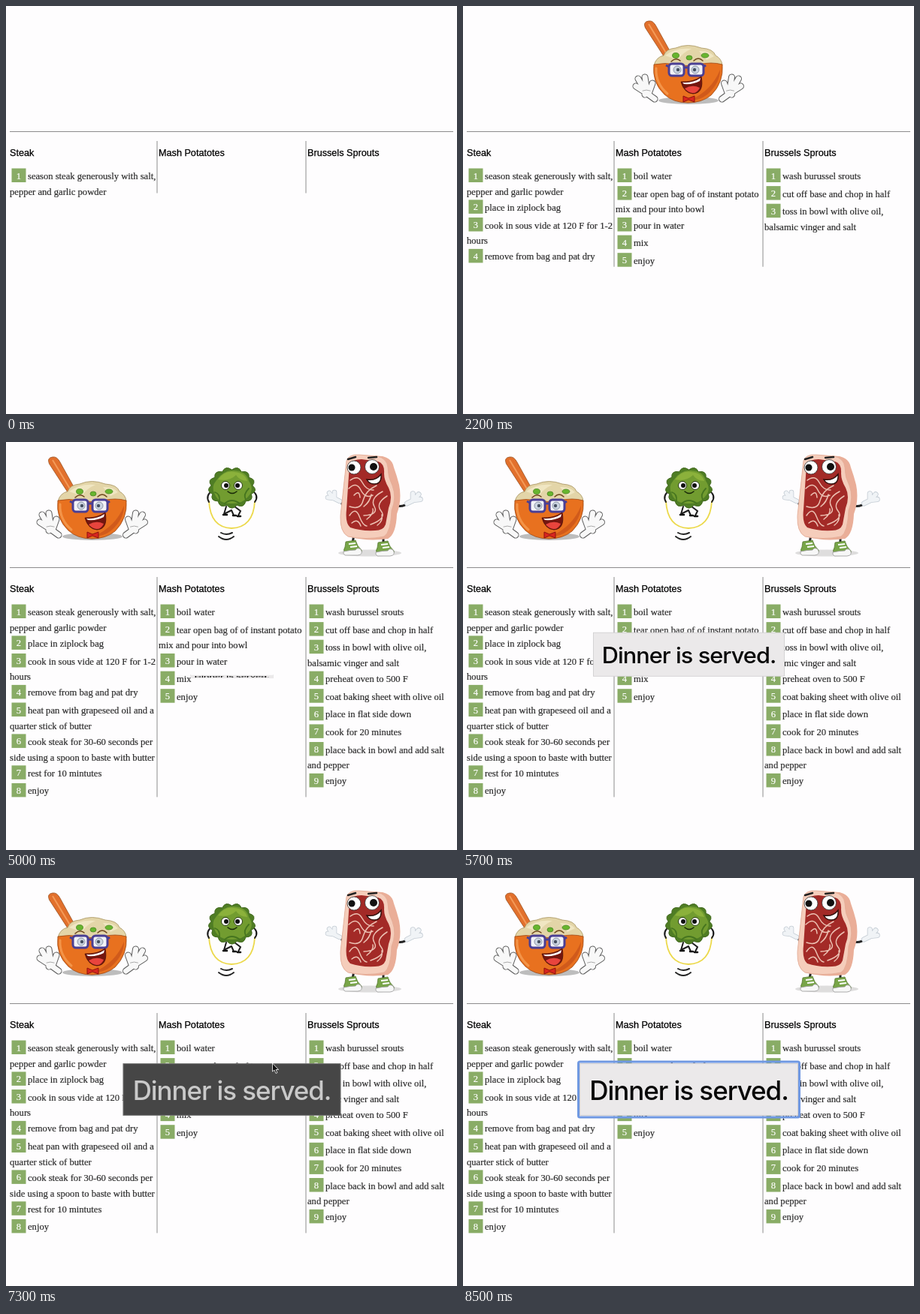
Animation, 600 px wide and 544 px high, one loop 8600 ms. Source, as an HTML page:

```html
<!DOCTYPE html>
<html lang="en">
<head>
<meta charset="utf-8">
<title>Dinner</title>
<style>
html, body { margin: 0; width: 100%; height: 100%; overflow: hidden; background: #fefdfe; }
svg { display: block; }
.step { font: 12.6px "Liberation Serif", Times, serif; fill: #2c2c2c; }
.step text { stroke: #2c2c2c; stroke-width: .2; }
.step .num { fill: #fff; stroke: #fff; text-anchor: middle; }
.head { font: 12.65px "Liberation Sans", Arial, sans-serif; stroke: #000; stroke-width: .25; }
#button text { font: 500 35px Inter, Roboto, sans-serif; letter-spacing: -1.05px; text-anchor: middle; }
.line { fill: none; stroke-linecap: round; stroke-linejoin: round; }
</style>
</head>
<body>
<svg width="600" height="544" viewBox="0 0 600 544">
  <defs>
    <path id="fingers" d="M70 124L59 116L45 107M59 116L48 97M60 114L57 95M62 117L67 103M57 118L61 116"/>
    <g id="hand" class="line">
      <use href="#fingers" stroke="#5d5d5d" stroke-width="9"/>
      <use href="#fingers" stroke="#f8f8f8" stroke-width="7"/>
      <path d="M64 113Q59 111 54 113" stroke="#aaa"/>
    </g>
    <path id="glovePath" d="M444 79L436 75L428 74M436 75L430 68M437 75L437 67"/>
    <g id="glove" class="line">
      <use href="#glovePath" stroke="#c4ccd4" stroke-width="6.5"/>
      <use href="#glovePath" stroke="#f0f3f6" stroke-width="5"/>
    </g>
    <g id="shoe">
      <path d="M452 133L465 131Q467 139 473 144Q474 149 468 149L451 148Q448 144 451 140Z" fill="#78a548" stroke="#55772f" stroke-width=".8"/>
      <path d="M449 146Q458 144 465 144Q467 140 472 143Q476 150 468 151L451 151Q448 149 449 146Z" fill="#f7f7f7" stroke="#999" stroke-width=".8"/>
      <path d="M456 136l9-1M458 140l9-1" stroke="#fff" stroke-width="2"/>
    </g>
  </defs>

  <g id="bowl">
    <ellipse cx="115" cy="126" rx="40" ry="5" fill="#bdbdbd"/>
    <path d="M57.500 29Q54 21 62 20Q68 19 72 27L93 65L84 70Z" fill="#e2702c" stroke="#9a5020" stroke-width=".8"/>
    <path d="M62 24L86 64" stroke="#f39a58" stroke-width="2"/>
    <path d="M69 79Q72 68 82 66Q85 57 98 56Q114 49 132 56Q148 57 151 66Q159 70 160 79Q116 92 69 79Z" fill="#e3d5a8" stroke="#a8935f" stroke-width=".8"/>
    <path d="M84 66Q98 55 119 57Q107 62 101 72ZM129 60Q142 59 149 67L139 72Z" fill="#f0e6c2"/>
    <path d="M69 78Q84 75 99 78Q113 81 128 78Q146 74 160 78Q162 102 145 119Q133 129 114 129Q95 129 83 118Q66 102 69 78Z" fill="#e8711f" stroke="#9c4a18" stroke-width=".8"/>
    <path d="M72 83Q71 103 87 117" class="line" stroke="#f39448" stroke-width="3"/>
    <path d="M157 85Q157 103 140 118Q130 126 116 126Q146 113 157 85Z" fill="#d05a1b"/>
    <g fill="#68b52f" stroke="#417d1c" stroke-width=".7">
      <ellipse cx="98" cy="66" rx="4.500" ry="3.500"/><ellipse cx="116" cy="69" rx="4" ry="3"/><ellipse cx="137" cy="66" rx="5" ry="3"/>
    </g>
    <path d="M92 74Q98 68 104 73M122 73Q128 67 134 73" class="line" stroke="#6d461c" stroke-width="1.500"/>
    <g fill="#f2f3f7" stroke="#4a3f94" stroke-width="3">
      <rect x="89" y="77" width="20" height="16" rx="4"/><rect x="115" y="77" width="20" height="16" rx="4"/>
      <path d="M109 82h6M89 81l-4-2M135 81l3-2"/>
    </g>
    <g fill="#ccd5e2" stroke="#7b8698" stroke-width=".8"><circle cx="100" cy="85" r="5"/><circle cx="124" cy="85" r="5"/></g>
    <circle cx="101" cy="85" r="2.200" fill="#465062"/><circle cx="123" cy="85" r="2.200" fill="#465062"/>
    <path d="M105 101Q121 102 132 94Q136 116 121 117Q109 116 105 101Z" fill="#74160f" stroke="#4b1008" stroke-width=".8"/>
    <path d="M110 110Q120 104 130 109Q126 117 120 116Q114 115 110 110Z" fill="#e8443d"/>
    <path d="M107 102Q121 103 131 96L130 100Q121 105 109 104Z" fill="#fff"/>
    <path d="M108 120L115 123L123 120V128L115 125L108 128Z" fill="#d8261f" stroke="#8d130f"/>
    <use href="#hand"/><use href="#hand" transform="matrix(-1 0 0 1 229.500 0)"/>
  </g>

  <g id="sprout">
    <path d="M270 79Q272 114 300 115Q329 114 331 79" class="line" stroke="#ecd94a" stroke-width="1.800"/>
    <path d="M274 65Q265 72 270 80M328 65Q337 72 331 80M293 86L290 96L300 91L303 98M304 86L312 92L309 98" class="line" stroke="#1d1d1d" stroke-width="2"/>
    <path d="M289 97h5M302 98h4M308 99h4" class="line" stroke="#111" stroke-width="2.500"/>
    <path id="leaves" fill="#4f7d24" stroke="#42691f"/>
    <path d="M280 51Q289 37 304 38Q320 39 323 52Q331 63 322 73Q314 83 299 82Q283 82 278 70Q272 60 280 51Z" fill="#729c30"/>
    <path d="M282 50Q291 37 304 40Q318 41 321 52Q310 51 306 44Q297 53 282 50Z" fill="#8bb13b"/>
    <path d="M278 67Q285 69 284 79M323 62Q315 70 319 77M291 82Q300 74 311 82" class="line" stroke="#46751f" stroke-width="1.800"/>
    <g fill="#fff" stroke="#24380f"><circle cx="292" cy="58" r="5.500"/><circle cx="309" cy="58" r="5.500"/></g>
    <circle cx="293" cy="58" r="3" fill="#111"/><circle cx="308" cy="58" r="3" fill="#111"/>
    <path d="M295 66Q301 71 307 66" class="line" stroke="#182808" stroke-width="1.500"/>
    <path d="M286 121Q293 125 301 121M283 126Q293 134 303 126" class="line" stroke="#222" stroke-width="2"/>
  </g>

  <g id="meat">
    <ellipse cx="484" cy="148" rx="42" ry="4.500" fill="#dedddd"/>
    <path d="M463 124L461 134M502 125L502 135M448 85Q446 78 442 79M520 85Q529 87 535 81" class="line" stroke="#252525" stroke-width="3"/>
    <use href="#glove"/><use href="#glove" transform="matrix(-1.100 0 0 1.100 1022 -5)"/>
    <use href="#shoe"/><use href="#shoe" transform="translate(43 1)"/>
    <path d="M453 25Q456 16 470 17L501 19Q514 22 516 34Q520 45 523 57Q527 77 520 96Q519 123 508 129Q481 133 455 126Q444 120 445 98Z" fill="#eaae98"/>
    <path d="M453 25Q456 16 470 17L494 19Q507 22 508 34Q508 47 514 58Q520 74 513 91Q512 120 503 126Q479 131 455 126Q444 120 445 98Z" fill="#f5cdbb" stroke="#e2ab96" stroke-width=".8"/>
    <path d="M457 30Q461 23 473 23L495 26Q504 29 503 42Q503 51 509 61Q515 73 509 88Q507 99 505 110Q502 118 491 118Q472 119 458 114Q451 108 453 90Z" fill="#a32a27"/>
    <path d="M458 51Q468 43 474 54T489 64M456 62Q466 52 472 64T488 71M493 58Q478 65 475 78T457 86M501 66Q484 75 490 86T476 98M507 72Q491 82 499 92T485 110M457 98Q465 86 470 99T480 112M463 71Q470 63 471 74M460 108Q468 101 472 112M476 86Q484 80 486 70M480 103Q490 95 488 89M494 111Q502 105 500 97" class="line" stroke="#ecc0b2" stroke-width="1.500"/>
    <g fill="#fff" stroke="#333" stroke-width=".8"><circle cx="463" cy="34" r="9"/><circle cx="487" cy="33" r="9.500"/></g>
    <circle cx="460" cy="34" r="4.500" fill="#111"/><circle cx="489" cy="33" r="5" fill="#111"/>
    <path d="M455 23L465 20M482 21L493 20" class="line" stroke="#222" stroke-width="2.500"/>
    <path d="M480 50Q492 52 499 43Q500 56 490 56Q483 56 480 50Z" fill="#fff" stroke="#31100d" stroke-width="1.500"/>
  </g>

  <path d="M5 167.500H595" stroke="#8c8c8c"/>
  <path id="rules" stroke="#8c8c8c"/>
  <g id="lists"></g>

  <g id="button">
    <rect id="ring" x="-147" y="-37" width="294" height="74" rx="2" fill="none" stroke="#6f98e2" stroke-width="3"/>
    <rect id="face" x="-145" y="-34.500" width="290" height="69"/>
    <text id="label" y="14">Dinner is served.</text>
  </g>
  <path id="cursor" d="M354.500 247V258L357 256L359 260.500L361 259.500L359 255.500H362.500Z" fill="#111" stroke="#fff" stroke-width=".8"/>
</svg>

<script>
const LOOP = 8600, TICK = 100;
const $ = id => document.getElementById(id);
const show = (el, on) => { el.style.display = on ? '' : 'none'; };

// "|" marks a wrapped line; "at" holds the time of each step.
const columns = [
  { x: 5, title: 'Steak', at: [0, 300, 1100, 1900, 2700, 3400, 4100, 4700], steps: [
    'season steak generously with salt,|pepper and garlic powder', 'place in ziplock bag',
    'cook in sous vide at 120 F for 1-2|hours', 'remove from bag and pat dry',
    'heat pan with grapeseed oil and a|quarter stick of butter',
    'cook steak for 30-60 seconds per|side using a spoon to baste with butter',
    'rest for 10 mintutes', 'enjoy'] },
  { x: 203, title: 'Mash Potatotes', at: [100, 200, 900, 1200, 1500], steps: [
    'boil water', 'tear open bag of of instant potato|mix and pour into bowl',
    'pour in water', 'mix', 'enjoy'] },
  { x: 401, title: 'Brussels Sprouts', at: [200, 1000, 1800, 2300, 2600, 2800, 3100, 3500, 4200], steps: [
    'wash burussel srouts', 'cut off base and chop in half',
    'toss in bowl with olive oil,|balsamic vinger and salt', 'preheat oven to 500 F',
    'coat baking sheet with olive oil', 'place in flat side down', 'cook for 20 minutes',
    'place back in bowl and add salt|and pepper', 'enjoy'] }
];
// Drawn centre x and arrival time, in order of arrival.
const pictures = [
  { el: $('bowl'), x: 115, at: 1500 },
  { el: $('sprout'), x: 300, at: 4200 },
  { el: $('meat'), x: 485, at: 4700 }
];
const items = [];

for (const { x, title, at, steps } of columns) {
  let y = 231, html = `<text class="head" x="${x}" y="199.500">${title}</text>`;
  steps.forEach((step, i) => {
    const [first, rest] = step.split('|');
    html += `<g class="step"><rect x="${x + 2.5}" y="${y - 14.5}" width="19" height="18.500" fill="#89ac66"/>
      <text class="num" x="${x + 12}" y="${y - .5}">${i + 1}</text>
      <text x="${x + 24}" y="${y}">${first}</text>
      ${rest ? `<text x="${x}" y="${y + 20.8}">${rest}</text>` : ''}</g>`;
    items.push({ at: at[i], bottom: rest ? y + 18.5 : y + 4 });
    y += rest ? 41.9 : 23.6;
  });
  $('lists').innerHTML += html;
}
document.querySelectorAll('.step').forEach((el, i) => { items[i].el = el; });

const ring = Array.from({ length: 13 }, (_, i) => {
  const point = (k, r) => {
    const a = k * 2 * Math.PI / 13;
    return `${300.5 + r * 1.15 * Math.sin(a)} ${61 - r * Math.cos(a)}`;
  };
  return `${i ? '' : 'M' + point(0, 24)}Q${point(i + .5, 31)} ${point(i + 1, 24)}`;
});
$('leaves').setAttribute('d', ring.join('') + 'Z');

function draw(t) {
  let bottom = 0;
  for (const { el, at, bottom: end } of items) {
    show(el, t >= at);
    if (t >= at) bottom = Math.max(bottom, end);
  }
  $('rules').setAttribute('d', `M201 180V${bottom}M399 180V${bottom}`);

  // Pictures 150 wide share the row with equal gaps.
  const count = pictures.filter(p => t >= p.at).length;
  const gap = (590 - 150 * count) / (count + 1);
  pictures.forEach(({ el, x, at }, i) => {
    show(el, t >= at);
    el.setAttribute('transform', `translate(${80 + gap + i * (150 + gap) - x} 0)`);
  });

  // The button swings up while it grows.
  const left = Math.exp(-(t - 4794) / 434);
  const size = 1 - left;
  const tilt = Math.cos(Math.min(130 * left, 90) * Math.PI / 180);
  const hover = t >= 7000 && t < 8000;
  show($('button'), t >= 4800);
  $('button').setAttribute('transform',
    `translate(300.500 ${282 + 80 * left * left}) scale(${size} ${size * tilt})`);
  $('face').setAttribute('fill', hover ? '#464646' : '#ebe9ea');
  $('face').setAttribute('stroke', hover ? '#777' : '#d0ced0');
  $('label').setAttribute('fill', hover ? '#c9c9c9' : '#080808');
  show($('ring'), t >= 8000);
  show($('cursor'), hover);
}

function frame() {
  draw(Math.floor(performance.now() % LOOP / TICK) * TICK);
  requestAnimationFrame(frame);
}
frame();
</script>
</body>
</html>
```
